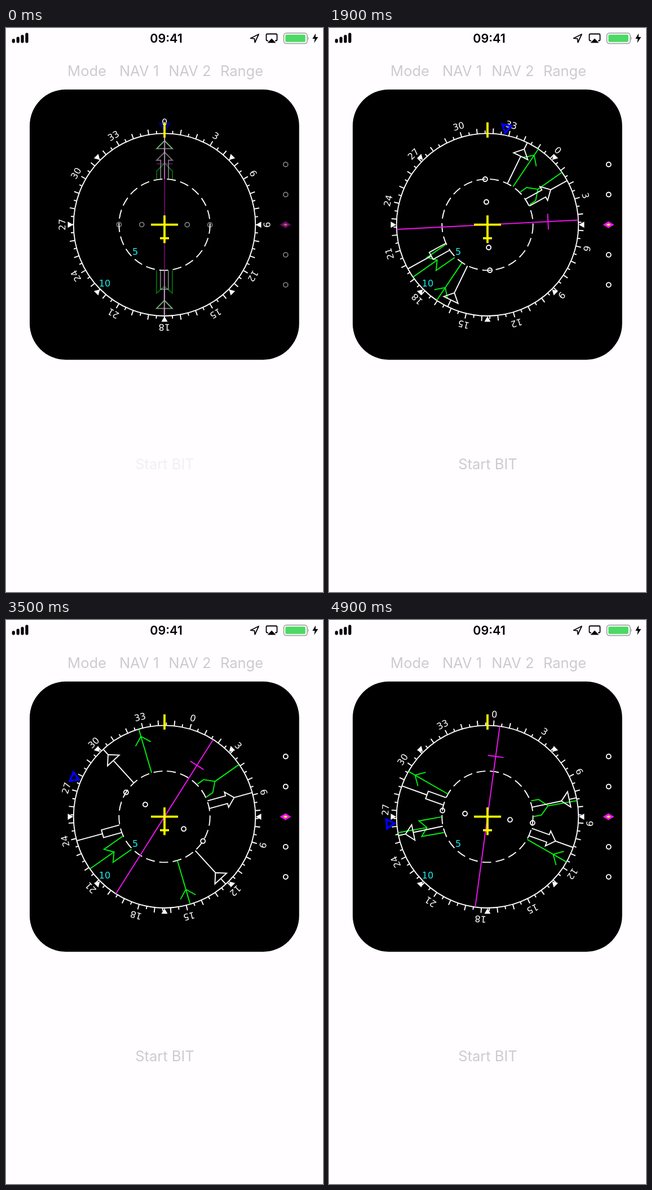
An HTML page for the animation above (5000 ms loop, 562 by 997 pixels).

```html
<!DOCTYPE html>
<html lang="en">
<head>
<meta charset="utf-8">
<style>
  html, body { margin: 0; width: 100%; height: 100%; overflow: hidden; background: #fffdff; }
  svg { display: block; width: 100%; height: 100%; }
  text { text-anchor: middle; }
  .ui { font: 25.5px Inter, Roboto, sans-serif; fill: #cccbcf; }
  .clock { font: 600 21.5px Inter, Roboto, sans-serif; fill: #000; }
  .dial { font: 16px "DejaVu Sans", sans-serif; fill: none; stroke-width: 1.9; }
  .dial text { fill: #fff; stroke: none; }
  .dial .range text { fill: #2ee; }
  .white { stroke: #fff; }
  .green { stroke: #00f010; }
  .magenta { stroke: #f012f0; }
  .yellow { stroke: #ff0; stroke-width: 3.8; }
</style>
</head>
<body>
<svg viewBox="0 0 562 997">
  <!-- status bar -->
  <path d="M13.3 21.5v2.3M21.2 18v5.8M29 14.5v9.3M36.9 11v12.8" stroke="#000" stroke-width="5.2" stroke-linecap="round"/>
  <text class="clock" x="284" y="25.5">09:41</text>
  <g fill="none" stroke="#000" stroke-width="1.8" stroke-linejoin="round">
    <path d="M448 11 433.5 18.2 440.5 18.8 441.3 25.6Z"/>
    <path d="M465 22.5h-1.5a2 2 0 0 1-2-2v-8a2 2 0 0 1 2-2h15a2 2 0 0 1 2 2v8a2 2 0 0 1-2 2h-1.5"/>
  </g>
  <path d="M471 18.5 478.5 26.2H463.5ZM549 9.5 543.3 19H547.5L546.3 26.5 553.3 16H548.8Z"/>
  <rect x="492.5" y="9" width="41.5" height="18.5" rx="4.5" fill="none" stroke="#999" stroke-width="1.5"/>
  <path d="M535.5 15q2.5 3 0 6.5Z" fill="#999"/>
  <rect x="495.3" y="11.7" width="35.5" height="13" rx="2" fill="#4cd964"/>

  <g class="ui">
    <text x="143.5" y="85">Mode</text>
    <text x="236" y="85">NAV 1</text>
    <text x="326" y="85">NAV 2</text>
    <text x="418" y="85">Range</text>
    <text id="button" x="281.5" y="780">Start BIT</text>
  </g>

  <rect x="42" y="108.7" width="477.7" height="477.7" rx="64"/>
  <g class="dial" transform="translate(281 347.7)">
    <circle class="white" r="161.3"/>
    <circle class="white" r="80.7" stroke-dasharray="16 8"/>
    <g id="fixed" fill="#fff"></g>
    <g id="card"><path id="ticks" class="white"/></g>
    <g class="range"><text x="-52" y="53.5">5</text><text x="-106" y="109">10</text></g>

    <g class="fade green" id="g1">
      <path d="M0-161V-81M-14-134 0-148 14-134M0 161V81M-14 148 0 134 14 148"/>
    </g>
    <g class="fade green" id="g2">
      <path d="M0-161V-109M-14-81V-94.5L0-109 14-94.5V-81M0 161V109M-14 81V121L0 109 14 121V81"/>
    </g>
    <g class="fade white" id="w1">
      <path d="M0-81V-134.5M-14-134.5H14L0-148.5ZM0-148.5V-161M0 81V134M-14 148H14L0 134ZM0 148V161"/>
    </g>
    <g class="fade white" id="w2">
      <path d="M0-161V-128M-7-81V-114H-14L0-128 14-114H7V-81M0 161V114M-7 81V114H7V81"/>
    </g>
    <g class="fade" id="course">
      <path class="magenta" d="M0-161V161M-14-107.5H14"/>
      <g class="white" id="dots"></g>
    </g>
    <path class="fade" id="bug" d="M-8.2-179.2H8.2L0-165.5Z" stroke="#00f" stroke-width="3.6"/>
    <g class="fade white" id="slope"></g>
    <g class="fade">
      <path d="M204.5 0 214.5-6 224.5 0 214.5 6Z" fill="#f012f0"/>
      <path d="M210.5 0 214.5-2.2 218.5 0 214.5 2.2Z" fill="#fe3"/>
    </g>
    <path class="yellow" d="M0-181V-154M-24 0H24M0-16.5V32.5M-8 24H8"/>
  </g>
</svg>
<script>
const $ = id => document.getElementById(id);
const add = (id, markup) => $(id).insertAdjacentHTML('beforeend', markup);

// Dial furniture
let ticks = '';
for (let deg = 0; deg < 360; deg += 5) {
  const a = deg * Math.PI / 180, sin = Math.sin(a), cos = Math.cos(a);
  const end = deg % 10 ? 166.5 : 170.5;
  ticks += `M${161 * sin} ${-161 * cos}L${end * sin} ${-end * cos}`;
  if (deg % 30 === 0) add('card', `<text y="-175.7" transform="rotate(${deg})">${deg / 10}</text>`);
  if (deg && deg % 45 === 0) add('fixed', `<path d="M0-162-5.5-171.5H5.5Z" transform="rotate(${deg})"/>`);
}
$('ticks').setAttribute('d', ticks);
for (const k of [-2, -1, 1, 2]) {
  add('dots', `<circle cx="${k * 40.3}" r="4"/>`);
  add('slope', `<circle cx="214.8" cy="${k * 53.2}" r="4"/>`);
}

// Ease-in-out: cubic-bezier(.42, 0, .58, 1)
function ease(x) {
  let lo = 0, hi = 1;
  for (let i = 0; i < 30; i++) {
    const s = (lo + hi) / 2, r = 1 - s;
    if (1.26 * r * r * s + 1.74 * r * s * s + s * s * s < x) lo = s; else hi = s;
  }
  return lo * lo * (3 - 2 * lo);
}

// Swing to an angle and back at a mean 20 degrees per second
function swing(angle, sec) {
  const half = Math.abs(angle) / 20;
  const phase = (sec / half) % 2;
  return angle * ease(phase > 1 ? 2 - phase : phase);
}

const swings = { g1: -320, g2: 270, w1: -180, w2: 180, course: 45, bug: -98 };
const turn = (id, deg) => $(id).setAttribute('transform', `rotate(${deg})`);
const faders = document.querySelectorAll('.fade > *, path.fade');

function draw(now) {
  const ms = Math.floor(now % 5000 / 100) * 100;
  const sec = ms / 1000 + 0.062;
  const card = swing(45, sec);
  turn('card', card);
  for (const id in swings) turn(id, card + swing(swings[id], sec));
  const fade = Math.min(1, 0.45 + ms / 400);
  for (const el of faders) el.style.opacity = fade;
  $('button').style.opacity = Math.min(1, 0.27 + ms / 350);
}

const start = performance.now();
function loop() {
  draw(performance.now() - start);
  requestAnimationFrame(loop);
}
loop();
</script>
</body>
</html>
```
